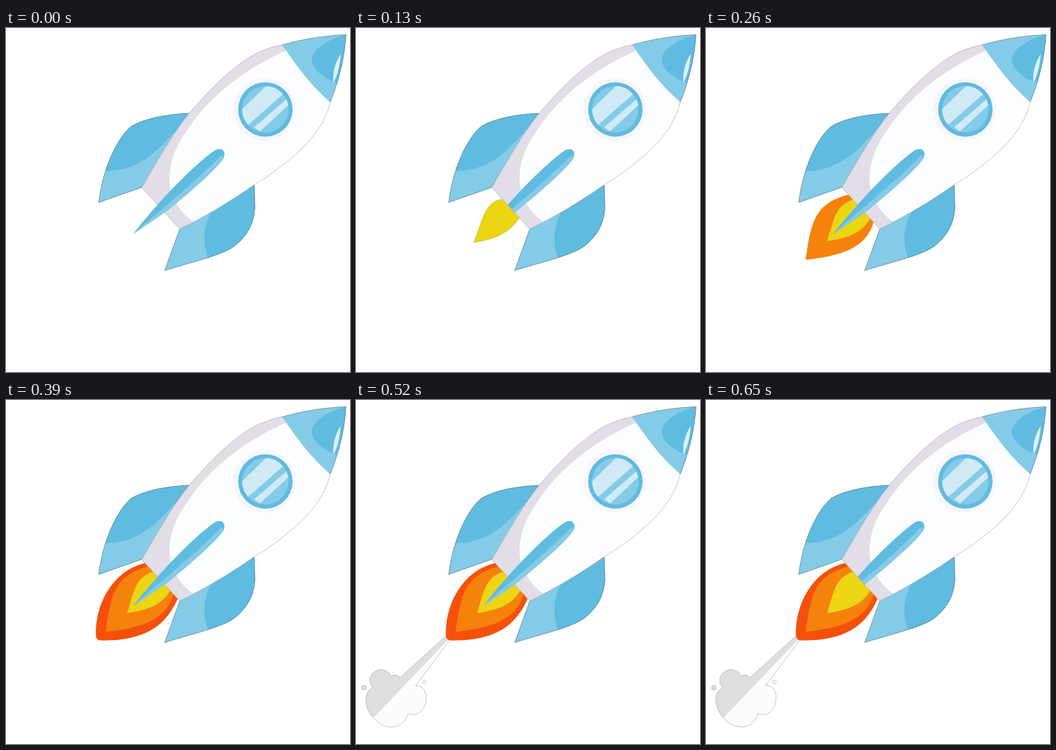
Recreate the animation shown at these times as an HTML page without scripts. Size 480 by 480 pixels, loop 0.78 s.

```html
<!DOCTYPE html>
<html lang="en">
<head>
<meta charset="utf-8">
<title>Rocket</title>
<style>
  html, body { margin: 0; width: 100%; height: 100%; overflow: hidden; background: #fff; }
  svg { display: block; width: 100vw; height: 100vh; }

  .light { fill: #84cbe7; }
  .deep { fill: #5fbbe0; }
  .shade { fill: #e2dde6; }
  .glass { fill: #d0eaf5; }
  .yellow { fill: #ecd513; }
  .orange { fill: #f5820d; }
  .red { fill: #f4500c; }
  .hull { fill: #fbfdff; }
  .puff { fill: #fcfcfd; }
  .haze { fill: #dedddf; }
  .edge { fill: none; stroke: #3f5765; stroke-width: .65; stroke-opacity: .8; }
  .soft { stroke: #808088; stroke-opacity: .65; }

  /* six equal poses, hard cuts */
  .spark, .burn, .blaze, .smoke, .tail { animation: 780ms step-end infinite; }
  .spark { animation-name: spark; }
  .burn { animation-name: burn; }
  .blaze { animation-name: blaze; }
  .smoke { animation-name: smoke; }
  .tail { animation-name: tail; }
  @keyframes spark { 0%, 33.333% { visibility: hidden } 16.667% { visibility: visible } }
  @keyframes burn { 0% { visibility: hidden } 33.333% { visibility: visible } }
  @keyframes blaze { 0% { visibility: hidden } 50% { visibility: visible } }
  @keyframes smoke { 0% { visibility: hidden } 66.667% { visibility: visible } }
  @keyframes tail { 0%, 33.333% { visibility: visible } 16.667%, 83.333% { visibility: hidden } }
</style>
</head>
<body>
<svg viewBox="0 0 480 480">
  <defs>
    <path id="body" d="M190 223C211 188 231 151 255 121C287 84 320 50 354 34Q370 27 386 24L453 104C446 135 424 161 400 181Q376 202 346 220C310 245 276 265 243 281Z"/>
    <path id="nose" d="M386 24C415 16 445 11 475 10C473 42 465 75 453 104C426 81 405 52 386 24Z"/>
    <path id="finL" d="M256 119.500C226 121 195 126 175 138C154 156 135 200 130 244L190 223Z"/>
    <path id="finR" d="M347 220L348 252C346 275 337 289 325 300C308 317 270 324 222 339L243 281Z"/>
    <path id="cloud" d="M25 444C11 430 11 407 24 402C14 390 24 376 37 377Q47 378 49 386Q57 382 62 388L127 329L132 335L84 399C96 399 100 411 98 421C96 435 85 443 73 438C70 450 61 457 49 457Q35 456 25 444Z"/>
    <clipPath id="inBody"><use href="#body"/></clipPath>
    <clipPath id="inFinL"><use href="#finL"/></clipPath>
    <clipPath id="inFinR"><use href="#finR"/></clipPath>
    <clipPath id="inCloud"><use href="#cloud"/></clipPath>
    <clipPath id="inPane"><circle cx="362.500" cy="114" r="32.500"/></clipPath>
    <g id="keel">
      <path class="deep" d="M178 288C205 252 262 192 291 172C301 166 308 172 304 182C298 193 262 226 222 258Q200 273 178 288Z"/>
      <path class="light" d="M178 288C215 255 265 215 301 178Q304 179 303 183C298 193 262 226 222 258Q200 273 178 288Z"/>
    </g>
  </defs>

  <g transform="translate(-.6 -.6)">
    <g class="smoke">
      <use href="#cloud" class="puff"/>
      <path class="haze" clip-path="url(#inCloud)" d="M25 444L131 333L120 320L0 360V444Z"/>
      <use href="#cloud" class="edge soft"/>
      <circle class="haze" cx="11.500" cy="402" r="3.200"/>
      <circle class="edge soft" cx="11.500" cy="402" r="3.200"/>
      <circle class="edge soft" cx="96" cy="394" r="2.500"/>
    </g>

    <path class="blaze red" d="M194 228C148 240 125 286 126 329Q127 336 133 336C190 337 222 319 240 278L225 240Z"/>
    <g class="burn">
      <path class="orange" d="M199 233C151 246 147 273 139.500 324C185 319 226 309 235 269L225 240Z"/>
      <path class="yellow" d="M206 240C180 248 179 270 169.500 298C200 293 219 287 231 264L225 240Z"/>
    </g>
    <g class="spark">
      <path class="yellow" d="M205 239.500C181 243 179 264 165 300C196 294 213 288 229 265L225 240Z"/>
      <path class="edge" d="M205 239.500C181 243 179 264 165 300C196 294 213 288 229 265" style="stroke:#a99a18"/>
    </g>

    <use href="#finL" class="light"/>
    <path class="deep" clip-path="url(#inFinL)" d="M138 200C174 201 200 184 225 157L270 110H120Z"/>
    <use href="#finL" class="edge"/>
    <use href="#finR" class="light"/>
    <path class="deep" clip-path="url(#inFinR)" d="M287 257C275 280 275 302 283 323H360V210Z"/>
    <use href="#finR" class="edge"/>

    <use href="#body" class="hull"/>
    <path class="shade" clip-path="url(#inBody)" d="M392 32C337 55 283 96 252 145C231 174 225 205 231 228Q240 256 262 271L240 290L180 225L250 110L380 10Z"/>
    <use href="#body" class="edge soft"/>

    <use href="#nose" class="light"/>
    <path class="deep" d="M475 10C450 16 430 29 427 43C427 57 442 70 462 77C469 58 473 36 475 10Z"/>
    <path fill="#dcf2fa" d="M467.500 37C460 48 456 63 457.500 77C463 67 467 51 467.500 37Z"/>
    <path class="edge" d="M386 24C415 16 445 11 475 10C473 42 465 75 453 104"/>

    <circle cx="361.500" cy="114" r="43.500" fill="#f8f5f8"/>
    <circle class="deep" cx="362.500" cy="114.300" r="38"/>
    <g clip-path="url(#inPane)">
      <path class="light" d="M325 75H400V150H325Z"/>
      <path class="glass" d="M328 116L365 80H380L387 93L338 136L328 128Z"/>
      <path class="glass" d="M393 99L347 139L355 145L398 105Z"/>
    </g>

    <g clip-path="url(#inBody)"><use href="#keel"/></g>
    <use href="#keel" class="tail"/>
  </g>
</svg>
</body>
</html>
```
